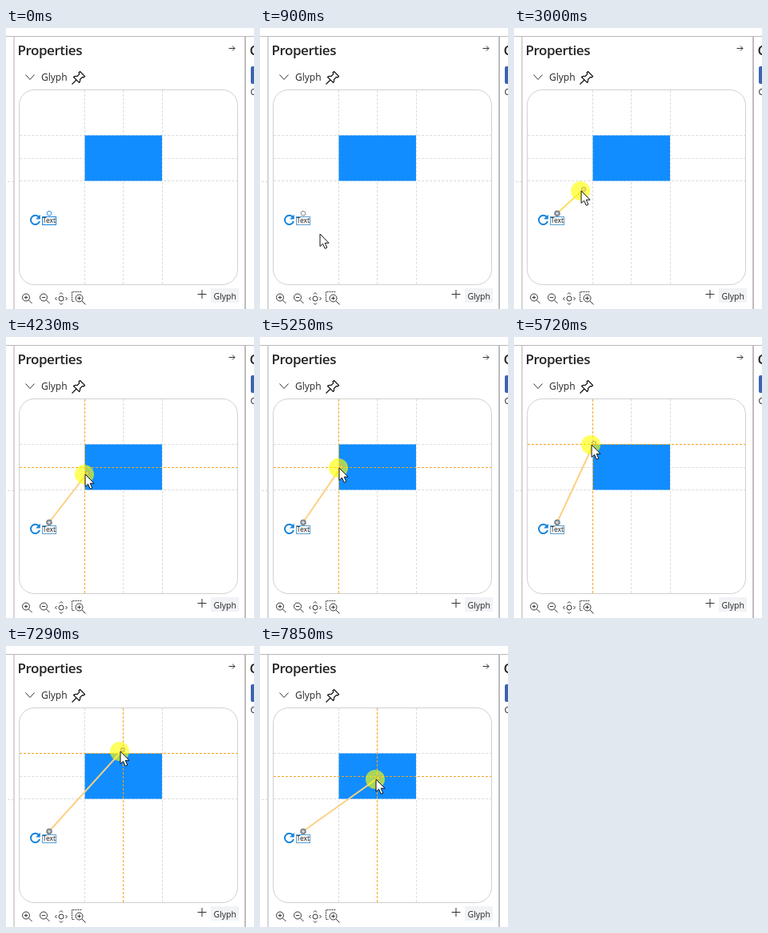
These frames come from a looping animation (310 px wide and 352 px high, 8 s). An HTML page:

```html
<!DOCTYPE html>
<html lang="en">
<head>
<meta charset="utf-8">
<title>Glyph connector</title>
<style>
  html, body { margin: 0; width: 100%; height: 100%; overflow: hidden; background: #fff; }
  svg { display: block; width: 310px; height: 352px; }
  text { font-family: "Open Sans", "Noto Sans", sans-serif; fill: #252423; }
  .title { font-size: 17px; font-weight: 600; letter-spacing: -.45px; }
  .icon { fill: none; stroke: #333; stroke-width: 1; }
  .grid { stroke: #dcdcdc; stroke-dasharray: 3 2; }
  .guide { stroke: #f5a623; stroke-dasharray: 3 2; }
</style>
</head>
<body>
<svg viewBox="0 0 310 352">
  <rect width="310" height="352" fill="#fff"/>
  <path d="M0 10.5H310" stroke="#b9b9b9"/>
  <path d="M10 11V352" stroke="#c4c4c4" stroke-width="1.4"/>
  <path d="M299 11V352" stroke="#bdbdbd" stroke-width="2"/>
  <path d="M2 192.5H9" stroke="#dcdcdc" stroke-dasharray="3 2"/>

  <text class="title" x="14.5" y="34">Properties</text>
  <text class="title" x="304.5" y="34">C</text>
  <rect x="306" y="48" width="12" height="22" rx="2" fill="#3d62b3"/>
  <text x="305.5" y="84" font-size="11">C</text>
  <path class="icon" d="M278.5 25.5H286M283 22.5L286 25.5L283 28.5"/>
  <path class="icon" stroke-width="1.3" d="M24.5 58.5L30 64.5L35.5 58.5"/>
  <text x="44" y="66" font-size="12">Glyph</text>
  <path class="icon" style="stroke:#111;stroke-width:1.2"
    d="M92.5 54.5L98.5 60.5L97 62L95.5 61.5L92.5 64.5C93 66.5 92.5 67.5 91.5 68.5L84.5 61.5C85.5 60.5 87 60 89 60.5L91.8 57.7L91 56ZM88 65L82.5 70.5"/>

  <rect x="16.5" y="77.5" width="273" height="244" rx="19" fill="#fff" stroke="#d0d0d0"/>
  <g id="grid"></g>
  <rect x="98.5" y="134.5" width="96.5" height="57" fill="#128dff"/>
  <g id="guides"></g>

  <path d="M41.2 237.2A5.6 5.6 0 1 0 42 242" fill="none" stroke="#1684dc" stroke-width="2"/>
  <path d="M42.8 233.8V239.4H37.2Z" fill="#1684dc"/>
  <rect id="label" x="45.5" y="236.5" width="17" height="10" fill="#fff"/>
  <text x="45.8" y="244.4" font-size="8.5" style="fill:#111">Text</text>

  <g class="icon">
    <circle cx="25" cy="337.5" r="4.5"/>
    <path d="M28.3 340.8L32.5 345M22.8 337.5H27.2M25 335.3V339.7"/>
    <circle cx="47" cy="337.5" r="4.5"/>
    <path d="M50.3 340.8L54.5 345M44.8 337.5H49.2"/>
    <circle cx="69" cy="339" r="3"/>
    <path d="M67 333.5L69 331.5L71 333.5M67 344.5L69 346.5L71 344.5M63.5 337L61.5 339L63.5 341M74.5 337L76.5 339L74.5 341"/>
    <path d="M94 331V330.5H82.5V342.5H86" stroke-dasharray="2 1"/>
    <circle cx="91.5" cy="338.5" r="4.5"/>
    <path d="M94.8 341.8L99.5 346.5M89.3 338.5H93.7M91.5 336.3V340.7"/>
    <path d="M239.5 333.5H250.5M245 328V339"/>
  </g>
  <rect x="256" y="326" width="35" height="18" fill="#f1f3f6"/>
  <text x="259.5" y="339.5" font-size="10.5">Glyph</text>

  <line id="link" x1="54" y1="232" stroke-width="2"/>
  <circle id="handle" cx="54" cy="232.2" r="2.8"/>
  <circle id="halo" r="12" fill="#ffff00" fill-opacity=".63"/>
  <circle id="tip" r="2.4" fill="none" stroke="#c9b75c" stroke-width="1.2"/>
  <path id="cursor" d="M0 0V15.5L3.5 12.3L6.2 18.3L8.8 17.1L6.2 11.3H11Z" fill="#fff" stroke="#111" stroke-linejoin="round"/>
</svg>
<script>
const LOOP = 8000, ENTER = 260, HOVER = 600, PRESS = 2170, DRAG = 2370;
const COLUMNS = [98, 146, 195], ROWS = [134, 163, 191];

// time, x, y of the pointer
const PATH = [
  [260, 238, 338], [900, 75, 258], [1560, 75, 258], [1970, 54, 239],
  [2240, 51.5, 234], [2370, 52, 234], [3000, 84, 204], [3140, 91, 198],
  [3420, 95, 194], [3950, 95, 194], [4230, 99, 172], [4500, 99, 164],
  [5250, 99, 164], [5720, 97, 135], [5990, 97, 135], [6480, 124, 131],
  [6750, 141, 132], [6890, 143, 132], [7290, 143, 132], [7850, 145, 167]
];

// snapped guide: direction, position, start, end
const SNAPS = [
  ["v", 98, 3090, 6200], ["v", 146, 6680, LOOP],
  ["h", 191, 3090, 4050], ["h", 163, 4160, 5400],
  ["h", 134, 5520, 7450], ["h", 163, 7640, LOOP]
];

const $ = id => document.getElementById(id);
const set = (el, attrs) => { for (const k in attrs) el.setAttribute(k, attrs[k]); };
const show = (el, on) => set(el, { visibility: on ? "visible" : "hidden" });

function addLine(parent, dir, pos, cls) {
  const line = document.createElementNS("http://www.w3.org/2000/svg", "path");
  const p = pos + 0.5;
  set(line, { class: cls, d: dir === "v" ? `M${p} 78V321` : `M17 ${p}H289` });
  return $(parent).appendChild(line);
}

COLUMNS.forEach(x => addLine("grid", "v", x, "grid"));
ROWS.forEach(y => addLine("grid", "h", y, "grid"));
const guides = SNAPS.map(([dir, pos, start, end]) =>
  ({ dir, start, end, el: addLine("guides", dir, pos, "guide") }));

function pointerAt(t) {
  const i = PATH.findIndex(p => p[0] > t);
  if (i === 0) return PATH[0].slice(1);
  if (i < 0) return PATH[PATH.length - 1].slice(1);
  const [t0, x0, y0] = PATH[i - 1], [t1, x1, y1] = PATH[i];
  let k = (t - t0) / (t1 - t0);
  if (i === 1) k = 1 - (1 - k) ** 2;
  return [x0 + (x1 - x0) * k, y0 + (y1 - y0) * k];
}

function draw(t) {
  const [x, y] = pointerAt(t);
  const pressed = t >= PRESS, dragging = t >= DRAG;
  const snapped = { v: false, h: false };
  for (const { dir, start, end, el } of guides) {
    const on = t >= start && t < end;
    show(el, on);
    if (on) snapped[dir] = true;
  }
  const endX = x + 3, endY = y - 2;
  show($("link"), dragging);
  set($("link"), { x2: endX, y2: endY, stroke: snapped.v && snapped.h ? "#fdd085" : "#fbdf60" });
  show($("tip"), dragging);
  set($("tip"), { cx: endX, cy: endY });
  show($("halo"), pressed);
  set($("halo"), { cx: x - 1, cy: y });
  show($("cursor"), t >= ENTER);
  set($("cursor"), { transform: `translate(${x} ${y})` });
  set($("handle"), {
    fill: dragging ? "#d5d9dc" : "#fff",
    stroke: t < HOVER ? "#2b8fe0" : "#7d868c",
    "stroke-width": dragging ? 2 : 1
  });
  set($("label"), { stroke: t < HOVER ? "#1684dc" : "#5a9fcf" });
}

function tick() {
  draw(performance.now() % LOOP);
  requestAnimationFrame(tick);
}
tick();
</script>
</body>
</html>
```
